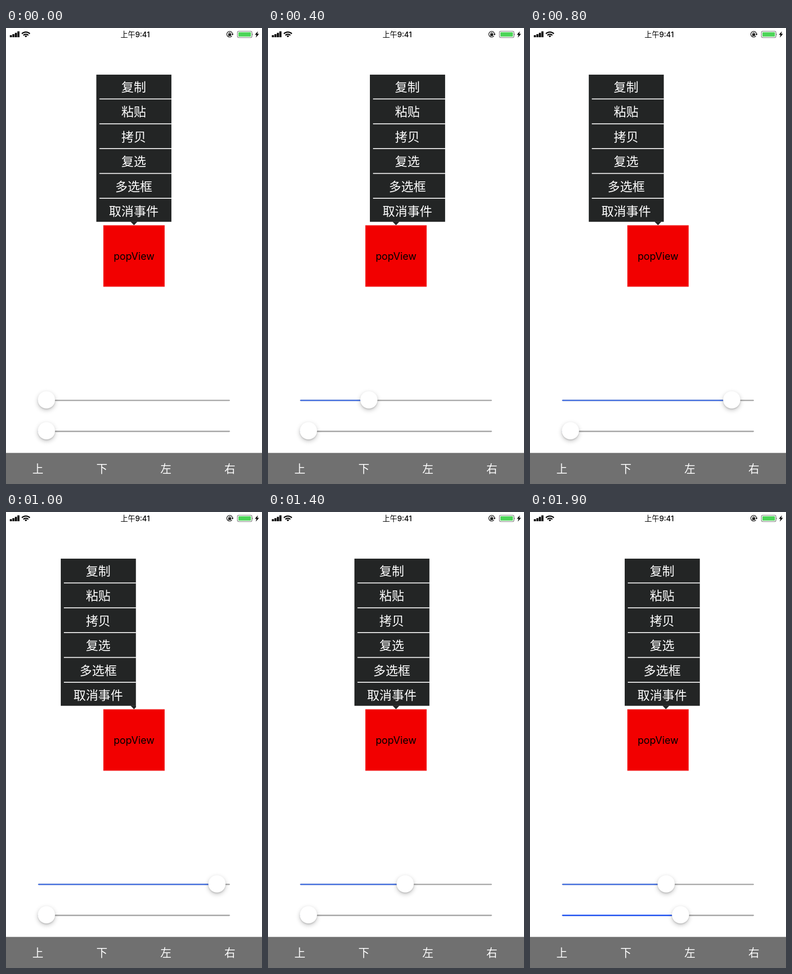
Animation, 500 px wide and 889 px high, one loop 2 s. Source, as an HTML page:

```html
<!DOCTYPE html>
<html lang="zh-CN">
<head>
<meta charset="utf-8">
<title>popView</title>
<style>
  html, body { margin: 0; width: 100%; height: 100%; overflow: hidden; background: #fff; }
  svg { display: block; width: 100vw; height: 100vh; }
  text { font-family: Inter, "Noto Sans CJK SC", "Noto Sans CJK", sans-serif; text-anchor: middle; }
  .row { font-size: 24.2px; font-weight: 300; fill: #fff; }
  .tab { font-size: 21.5px; font-weight: 300; fill: #fff; }
  .track { stroke: #a9a9a9; }
  .track, .fill { stroke-width: 2.7; stroke-linecap: round; }
  .thumb { fill: #fff; filter: drop-shadow(0 2px 1px rgba(0,0,0,.1)) drop-shadow(0 3.5px 4.5px rgba(0,0,0,.24)); }
</style>
</head>
<body>
<svg viewBox="0 0 500 889">
  <rect width="500" height="889" fill="#fff"/>

  <g id="status">
    <path d="M7.5 14h4v4h-4zM12.5 12h4v6h-4zM17.4 9.5h4v8.5h-4zM22.3 6.5h4v11.5h-4z"/>
    <g fill="none" stroke="#000" stroke-width="2.3">
      <path d="M31 11.2a11 11 0 0 1 15.6 0"/>
      <path d="M33.9 14.2a7 7 0 0 1 9.8 0"/>
    </g>
    <path d="M38.8 18.3l-2.6-2.7a3.8 3.8 0 0 1 5.2 0z"/>
    <text x="252.3" y="17.6" font-size="14.4" font-weight="500">上午9:41</text>
    <g fill="none" stroke="#000" stroke-width="1.2">
      <path d="M441.3 15.6a5.6 5.6 0 1 1 1.2-3.4"/>
      <path d="M435.4 12v-1.5a1.5 1.5 0 0 1 3 0V12"/>
    </g>
    <path d="M434.2 11.6h5.4v3.8h-5.4zM440.2 11.4h4.4l-2.2 2.9z"/>
    <rect x="452" y="6.3" width="28.4" height="12.4" rx="2.6" fill="#fff" stroke="#777" stroke-width="1.1"/>
    <rect x="454" y="8.2" width="24.4" height="8.6" rx="1" fill="#4cd558"/>
    <path d="M481.3 10.4q2 2.1 0 4.2z" fill="#777"/>
    <path d="M492 6.5l-6 6.8h3.4l-1.6 5.4 6.4-7.2h-3.5z"/>
  </g>

  <rect x="190.5" y="385" width="119" height="119" fill="#f20000" stroke="#f43030"/>
  <text x="250" y="452.4" font-size="19.5">popView</text>

  <g id="menu">
    <clipPath id="edge"><rect x="-.5" y="90.8" width="147" height="300"/></clipPath>
    <g clip-path="url(#edge)" fill="#232525">
      <rect x="-.5" y="90.8" width="147" height="287"/>
      <path id="arrow" d="M-6.8 377.5h13.6L0 384.4z"/>
    </g>
  </g>

  <g id="sliders"></g>

  <g id="tabs"><rect y="828.4" width="500" height="61" fill="#707070"/></g>
</svg>
<script>
const $ = id => document.getElementById(id);

function add(parent, tag, attrs, text = '') {
  const el = document.createElementNS('http://www.w3.org/2000/svg', tag);
  for (const key in attrs) el.setAttribute(key, attrs[key]);
  el.textContent = text;
  return parent.appendChild(el);
}

const MENU_W = 146.5, PITCH = 48.4, MIN = 79, RANGE = 342;

['复制', '粘贴', '拷贝', '复选', '多选框', '取消事件'].forEach((label, i) => {
  const y = 90.6 + i * PITCH;
  add($('menu'), 'text', { class: 'row', x: MENU_W / 2 - 0.5, y: y + 33.4 }, label);
  if (i) add($('menu'), 'rect', { x: 5.7, y: y - 1.5, width: MENU_W - 5.7, height: 1.7, fill: '#fff' });
});

['上', '下', '左', '右'].forEach((label, i) =>
  add($('tabs'), 'text', { class: 'tab', x: 62.2 + i * 125, y: 867 }, label));

function slider(y, color) {
  const g = $('sliders');
  add(g, 'path', { class: 'track', d: `M64 ${y}H436` });
  const fill = add(g, 'path', { class: 'fill', stroke: color });
  const thumb = add(g, 'circle', { class: 'thumb', cy: y - 1, r: 16.8 });
  return x => {
    fill.setAttribute('d', `M64 ${y}H${x}`);
    thumb.setAttribute('cx', x);
  };
}

const setOffset = slider(726, '#426ee0');
const setAnchor = slider(786.3, '#2b5cf5');

// Thumb positions, one per 100 ms; the last one holds
const offsetX = [79, 79, 97, 145, 197, 255, 312, 364, 394, 409, 412, 398, 352, 300, 268, 266];
const anchorX = [84, 113, 204, 294];
const STEP = 100, LOOP = 2000, TOUCH = 2, ANCHOR_TOUCH = 16;

function draw(now) {
  const step = Math.floor(now % LOOP / STEP);
  const x1 = offsetX[Math.min(step, offsetX.length - 1)];
  const x2 = step < ANCHOR_TOUCH ? MIN : anchorX[step - ANCHOR_TOUCH];
  // The menu is centred until a slider is first touched
  const ratio = step < TOUCH ? 0.5 : (x1 - MIN) / RANGE;
  const tip = step < ANCHOR_TOUCH ? 250 : 190 + 120 * (x2 - MIN) / RANGE;
  const inset = MENU_W * ratio;

  setOffset(x1);
  setAnchor(x2);
  $('menu').setAttribute('transform', `translate(${tip - inset} 0)`);
  $('arrow').setAttribute('transform', `translate(${inset} 0)`);
}

const start = performance.now();
function tick() {
  draw(performance.now() - start);
  requestAnimationFrame(tick);
}
tick();
</script>
</body>
</html>
```
